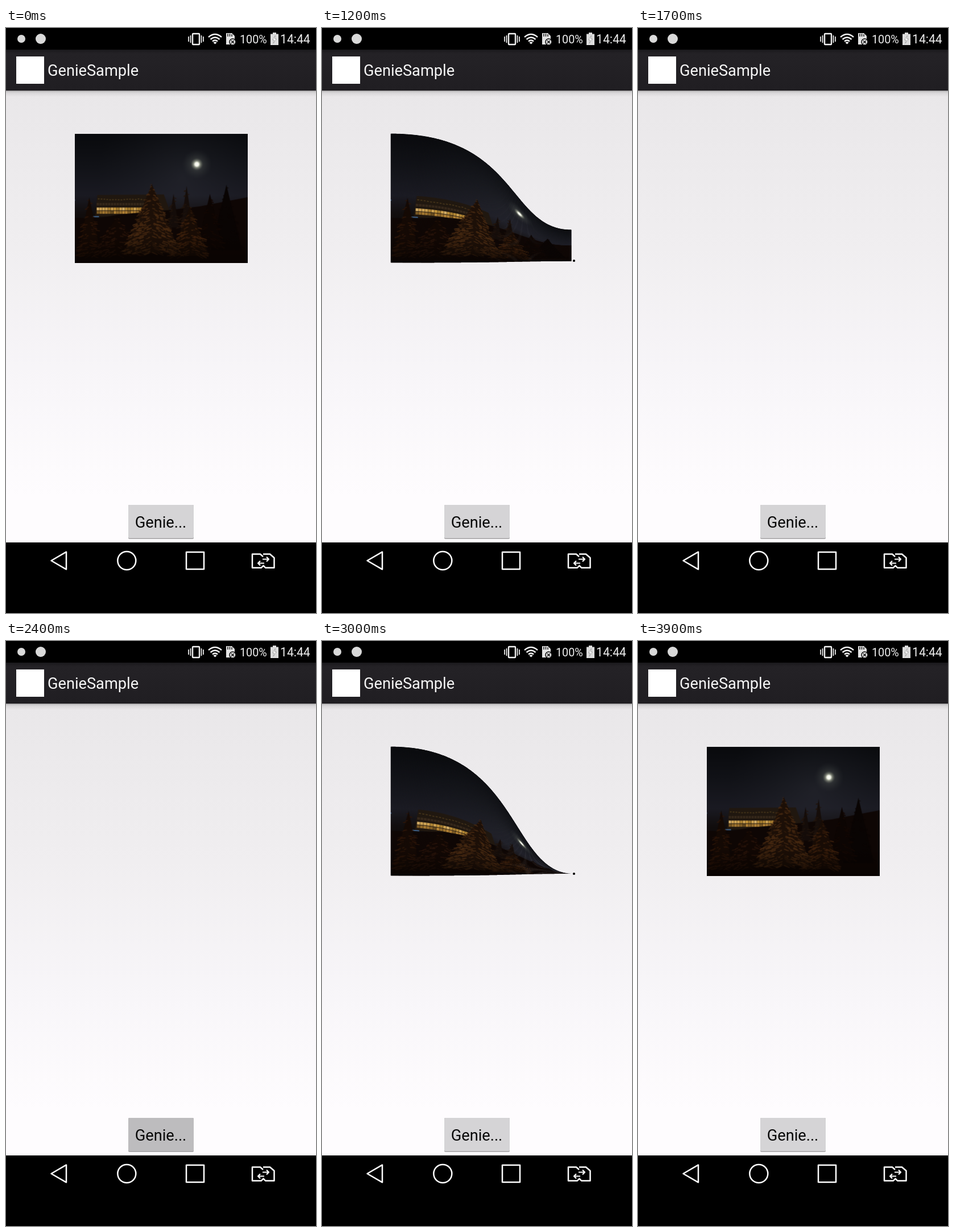
Recreate the animation shown at these times as an HTML page with a canvas. Size 545 by 1028 pixels, loop 4 s.

```html
<!DOCTYPE html>
<html lang="en">
<head>
<meta charset="utf-8">
<title>GenieSample</title>
<style>
  html, body { margin: 0; width: 100%; height: 100%; overflow: hidden; background: #000; }
  svg, canvas { position: absolute; left: 0; top: 0; display: block; }
  text { font-family: Roboto, sans-serif; }
</style>
</head>
<body>
<svg width="545" height="1028" viewBox="0 0 545 1028">
  <defs>
    <linearGradient id="page" x2="0" y2="1">
      <stop stop-color="#e9e7e9"/>
      <stop offset=".35" stop-color="#f0eef0"/>
      <stop offset=".65" stop-color="#f8f6f9"/>
      <stop offset=".9" stop-color="#fefcfe"/>
      <stop offset="1" stop-color="#fefcfe"/>
    </linearGradient>
    <linearGradient id="shade" x2="0" y2="1">
      <stop stop-color="#000" stop-opacity=".28"/>
      <stop offset=".3" stop-color="#000" stop-opacity=".08"/>
      <stop offset="1" stop-color="#000" stop-opacity="0"/>
    </linearGradient>
    <linearGradient id="bar" x2="0" y2="1">
      <stop stop-color="#1a191c"/>
      <stop offset=".1" stop-color="#242226"/>
      <stop offset="1" stop-color="#201e22"/>
    </linearGradient>
  </defs>
  <rect width="545" height="1028"/>
  <rect y="110" width="545" height="794" fill="url(#page)"/>
  <rect y="110" width="545" height="11" fill="url(#shade)"/>
  <rect y="38" width="545" height="72" fill="url(#bar)"/>
  <rect x="18" y="50" width="49" height="48" fill="#fff"/>
  <text x="73" y="84" font-size="27.2" fill="#f6f6f6">GenieSample</text>

  <!-- status bar -->
  <g fill="#d9d9d9">
    <circle cx="27" cy="19" r="7"/>
    <circle cx="61" cy="19" r="9"/>
  </g>
  <g fill="none" stroke="#f2f2f2" stroke-width="2.4">
    <rect x="328" y="10" width="12" height="19" rx="1"/>
    <path d="M321 15v9M324.5 13v13M343.5 13v13M347 15v9" stroke-width="1.7"/>
    <path d="M356 16Q367.5 6 379 16M359.500 20Q367.500 13 375.500 20M363 23.500Q367.500 19.500 372 23.500"/>
  </g>
  <path d="M364.5 25.5Q367.5 23 370.5 25.5L367.5 28.5Z" fill="#f2f2f2"/>
  <path d="M387 9h10l5 5v15h-15z" fill="#e4e4e4"/>
  <path d="M390 10v5M393.5 10v5M397 11v4" stroke="#111" stroke-width="1.4"/>
  <circle cx="398.5" cy="24.5" r="5.5" fill="#e4e4e4" stroke="#000" stroke-width="1.4"/>
  <path d="M396 22l5 5m0-5l-5 5" stroke="#111" stroke-width="1.5"/>
  <path d="M465 10.5h4V8h6v2.500h4V30h-14z" fill="#dcdcdc"/>
  <path d="M473.5 13l-5 8h3l-1.5 6 5.5-8h-3z" fill="#fff" stroke="#999" stroke-width=".8"/>
  <g fill="#eee">
    <text x="411" y="27" font-size="19.8">100%</text>
    <text x="482" y="27" font-size="21.2">14:44</text>
  </g>

  <rect x="215" y="838" width="115" height="60" rx="2" fill="#a5a4a6"/>
  <rect id="button" x="215" y="838" width="115" height="58.5" rx="2" fill="#d5d4d6"/>
  <text x="272" y="878" font-size="27.2" text-anchor="middle" fill="#080808">Genie...</text>

  <!-- navigation bar -->
  <g fill="none" stroke="#fff" stroke-width="2.5" stroke-linejoin="round">
    <path d="M79.5 936L106 920.7V951.300Z"/>
    <circle cx="212.3" cy="936" r="16"/>
    <rect x="317" y="921" width="31" height="30"/>
    <path d="M452 929L447 924.5H433V948.500H449L452 945M452 924.500H464L471.500 931V948.500H456L452 944"/>
    <path d="M451 933.5h11m-4-4l4 4-4 4M454 940.500h-11m4-4l-4 4 4 4" stroke-width="2.2"/>
  </g>
</svg>
<canvas id="stage" width="545" height="1028"></canvas>

<script>
const LOOP = 4000, STEP = 100;
const box = { x: 120.5, y: 185.5, w: 304, h: 227 };
const sink = { x: 443, y: 409 };
const ctx = document.getElementById('stage').getContext('2d');
const button = document.getElementById('button');
const clamp = v => Math.min(1, Math.max(0, v));
const mix = (a, b, k) => a + (b - a) * k;

function drawPhoto() {
  const canvas = document.createElement('canvas');
  canvas.width = box.w;
  canvas.height = box.h;
  const c = canvas.getContext('2d');
  let seed = 7;
  const random = () => (seed = seed * 16807 % 2147483647) / 2147483647;

  const fill = (color, points) => {
    c.fillStyle = color;
    c.beginPath();
    points.forEach(([x, y]) => c.lineTo(x, y));
    c.fill();
  };
  const shade = (gradient, stops) => {
    stops.forEach(([at, color]) => gradient.addColorStop(at, color));
    c.fillStyle = gradient;
    c.fillRect(0, 0, box.w, box.h);
  };
  const glow = (x, y, r, stops) => shade(c.createRadialGradient(x, y, 0, x, y, r), stops);

  // A conifer: a dark cone covered with drooping twigs.
  const tree = (x, top, width, bottom, twigs, cone, color) => {
    fill(cone, [[x, top], [x + width * .8, bottom], [x - width * .8, bottom]]);
    c.strokeStyle = color;
    for (let i = 0; i < twigs; i++) {
      const k = Math.sqrt(random()), side = random() < .5 ? -1 : 1;
      const y = mix(top, bottom, k), from = random() * width * k * .8;
      const reach = 3 + random() * 9 * k;
      c.lineWidth = .6 + random() * 1.4;
      c.beginPath();
      c.moveTo(x + side * from, y);
      c.lineTo(x + side * (from + reach), y + reach * (.1 + random() * .5));
      c.stroke();
    }
  };

  shade(c.createLinearGradient(0, 0, 0, box.h),
    [[0, '#090a0d'], [.25, '#111217'], [.48, '#1a1a22'], [.62, '#110d0d'], [1, '#080302']]);
  glow(190, 75, 150, [[0, 'rgba(60,62,72,.28)'], [1, 'rgba(40,42,50,0)']]);
  glow(215, 54, 26, [[0, 'rgba(120,125,115,.5)'], [.5, 'rgba(70,74,72,.35)'], [1, 'rgba(50,54,56,0)']]);
  glow(215, 54, 11, [[0, '#fff'], [.3, '#f4f6e8'], [.55, 'rgba(170,175,155,.6)'], [1, 'rgba(100,105,95,0)']]);

  fill('#20170f', [[40, 108], [157, 107], [170, 144], [36, 146]]);
  for (let x = 39; x < 130; x += 5) {
    c.fillStyle = '#4c3a1c';
    c.fillRect(x + 2, 114 + random() * 2, 3, 1.5);
    c.fillStyle = '#35271a';
    c.fillRect(x, 122, 4, 4);
    if (x < 118) {
      c.fillStyle = `hsl(39 55% ${38 + random() * 25}%)`;
      c.fillRect(x, 130, 4.5, 5);
      c.fillStyle = `hsl(37 55% ${25 + random() * 22}%)`;
      c.fillRect(x, 136, 4.5, 5);
    }
  }
  c.fillStyle = '#3d5f86';
  c.fillRect(31, 145, 12, 2);
  c.fillRect(0, 116, 1, 2);

  fill('#0e0604', [[0, 148], [40, 149], [80, 142], [170, 134], [220, 128], [304, 112], [304, 227], [0, 227]]);
  tree(267, 90, 34, 205, 60, '#090403', '#0b0504');
  tree(238, 106, 28, 200, 60, '#0c0503', '#140804');
  tree(197, 92, 14, 170, 40, '#150d0a', '#21140c');
  tree(174, 106, 12, 165, 30, '#140c09', '#21140c');
  tree(26, 112, 26, 215, 80, '#140904', '#2c1508');
  tree(75, 146, 60, 215, 120, '#110703', '#29140a');
  tree(203, 128, 42, 215, 150, '#180c05', '#3e210d');
  tree(136, 89, 62, 210, 330, '#1c0f07', '#452811');

  shade(c.createLinearGradient(0, 180, 0, box.h), [[0, 'rgba(8,3,1,0)'], [1, 'rgba(8,3,1,.75)']]);
  return canvas;
}

// S-shaped edge, looked up by its share of the arc length.
function edge(y0, x1, y1) {
  const N = 80, width = x1 - box.x, points = [];
  let length = 0;
  for (let i = 0; i <= N; i++) {
    const t = i / N, r = 1 - t;
    const x = box.x + width * (3 * .71 * t * r * r + 3 * .648 * t * t * r + t ** 3);
    const y = mix(y0, y1, t * t * (3 - 2 * t));
    if (i) length += Math.hypot(x - points[i - 1].x, y - points[i - 1].y);
    points.push({ x, y, length });
  }
  return share => {
    const goal = share * length;
    let i = 1;
    while (i < N && points[i].length < goal) i++;
    const a = points[i - 1], b = points[i];
    const k = (goal - a.length) / (b.length - a.length);
    return { x: mix(a.x, b.x, k), y: mix(a.y, b.y, k) };
  };
}

// Maps the photo column by column between its two bent edges.
function drawWarped(pinch, slide) {
  if (!pinch) return ctx.drawImage(photo, box.x, box.y);
  const right = mix(box.x + box.w, sink.x, pinch);
  const shares = Array.from({ length: box.w + 1 }, (_, i) => mix(slide, 1, i / box.w));
  const top = shares.map(edge(box.y, right, mix(box.y, sink.y, pinch)));
  const bottom = shares.map(edge(box.y + box.h, right, mix(box.y + box.h, sink.y, pinch)));

  ctx.save();
  ctx.beginPath();
  [...top, ...bottom.slice().reverse()].forEach(p => ctx.lineTo(p.x, p.y));
  ctx.clip();
  for (let i = 0; i < box.w; i++) {
    const a = top[i], b = top[i + 1], c = bottom[i];
    ctx.setTransform(b.x - a.x, b.y - a.y, (c.x - a.x) / box.h, (c.y - a.y) / box.h, a.x, a.y);
    ctx.drawImage(photo, i, 0, 1, box.h, 0, 0, 2, box.h);
  }
  ctx.restore();
}

const photo = drawPhoto();

function render(now) {
  const t = Math.floor(now % LOOP / STEP) * STEP;
  const closing = t < 2000;
  const pinch = closing ? clamp((t - 900) / 397) : clamp((3200 - t) / 200);
  const slide = closing ? clamp((t - 1300) / 400) ** 1.66 : clamp((3000 - t) / 200);

  ctx.clearRect(0, 0, 545, 1028);
  if (slide < 1) drawWarped(pinch, slide);
  if (t >= 900 && t < 1700 || t >= 2500 && t < 3200) {
    ctx.fillStyle = '#000';
    ctx.beginPath();
    ctx.arc(sink.x, sink.y, 2.1, 0, 7);
    ctx.fill();
  }
  button.setAttribute('fill', t === 2400 ? '#bdbcbe' : '#d5d4d6');
  requestAnimationFrame(render);
}
requestAnimationFrame(render);
</script>
</body>
</html>
```
